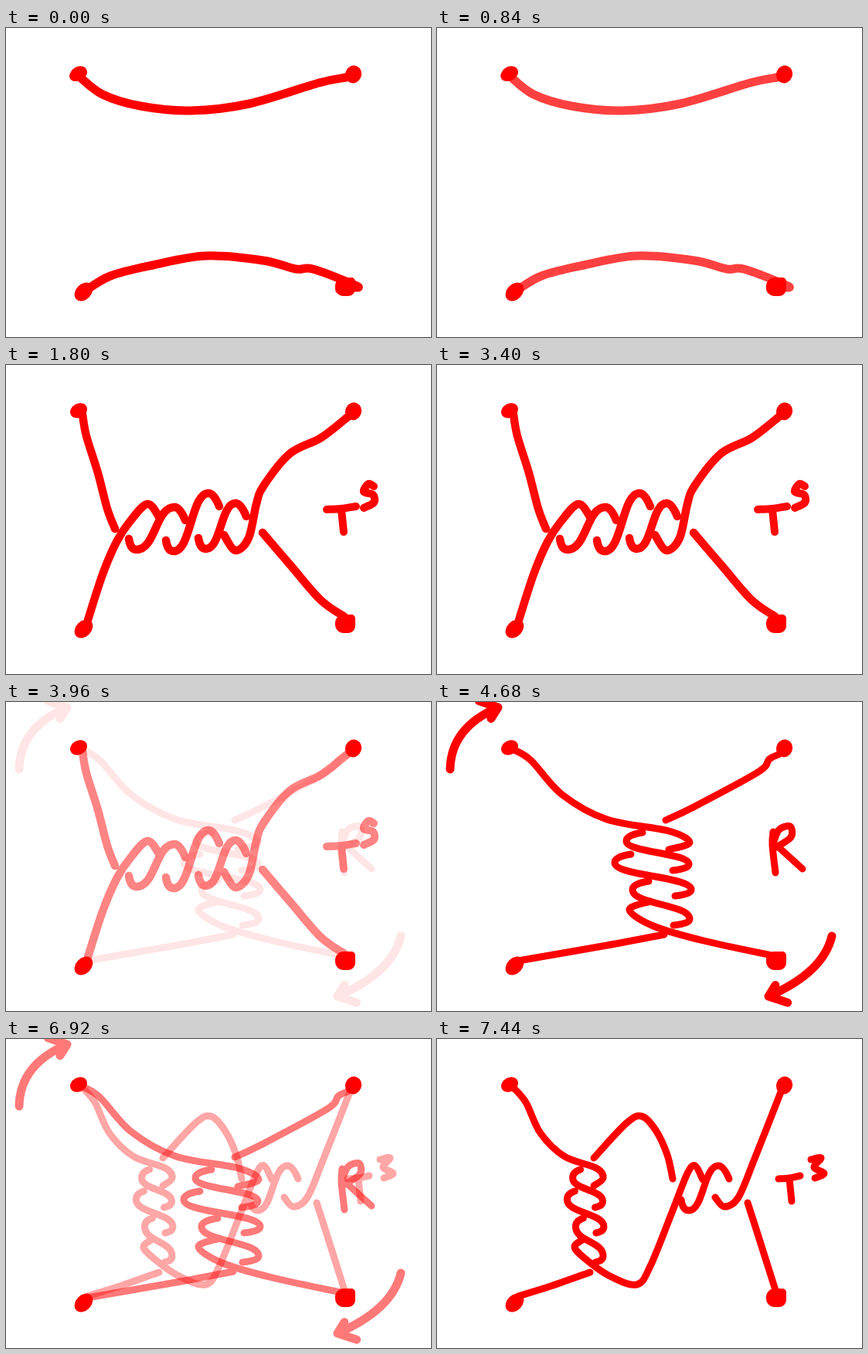
Animation, 550 px wide and 400 px high, one loop 8000 ms. Source, as an HTML page with a canvas:

```html
<!DOCTYPE html>
<html lang="en">
<head>
<meta charset="utf-8">
<title>Tangle moves</title>
<style>
html, body { margin: 0; width: 550px; height: 400px; overflow: hidden; background: #fff; }
canvas { display: block; }
</style>
</head>
<body>
<canvas id="stage" width="550" height="400"></canvas>
<script>
const ctx = document.getElementById('stage').getContext('2d');
const LOOP = 8000, STEP = 40;

// Smooth curve through a few points "x,y x,y ..."
function curve(text) {
  const pts = text.split(' ').map(s => s.split(',').map(Number));
  const at = i => pts[Math.max(0, Math.min(pts.length - 1, i))];
  const path = new Path2D();
  path.moveTo(...pts[0]);
  for (let i = 0; i < pts.length - 1; i++) {
    const [a, b, c, d] = [at(i - 1), at(i), at(i + 1), at(i + 2)];
    path.bezierCurveTo(
      b[0] + (c[0] - a[0]) / 6, b[1] + (c[1] - a[1]) / 6,
      c[0] - (d[0] - b[0]) / 6, c[1] - (d[1] - b[1]) / 6, c[0], c[1]);
  }
  return path;
}

// Strand of a horizontal twist: hook, low point, high point, hook
function wave(lowX, lowY, topX, topY) {
  const path = new Path2D(), mid = (lowX + topX) / 2;
  path.moveTo(lowX - 10, lowY - 14);
  path.quadraticCurveTo(lowX - 8, lowY, lowX, lowY);
  path.bezierCurveTo(mid, lowY, mid, topY, topX, topY);
  path.quadraticCurveTo(topX + 7, topY, topX + 14, topY + 17);
  return path;
}

// Strand of a vertical twist: hook, left turn, right turn, hook
function coil(left, y1, right, y2, hook) {
  const path = new Path2D(), mid = (y1 + y2) / 2;
  path.moveTo(left + hook, y1 - 11);
  path.quadraticCurveTo(left, y1 - 8, left, y1);
  path.bezierCurveTo(left, mid, right, mid, right, y2);
  path.quadraticCurveTo(right, y2 + 6, right - hook, y2 + 8);
  return path;
}

const coils = (mapX, hook) => [
  coil(mapX(245), 180, mapX(326), 210, hook),
  coil(mapX(230), 208, mapX(329), 243, hook),
  coil(mapX(253), 243, mapX(327), 281, hook)
];

function tee(x, y, w) {
  const path = curve(`${x - w / 2},${y + 1} ${x},${y} ${x + w / 2},${y - 3}`);
  path.moveTo(x, y + 1);
  path.lineTo(x + 3, y + 30);
  return path;
}

function arrow(x, y, cx, cy, tipX, tipY) {
  const path = new Path2D(), back = Math.atan2(cy - tipY, cx - tipX);
  path.moveTo(x, y);
  path.quadraticCurveTo(cx, cy, tipX, tipY);
  for (const [turn, len] of [[0.73, 26], [-0.61, 17]]) {
    path.moveTo(tipX, tipY);
    path.lineTo(tipX + len * Math.cos(back + turn), tipY + len * Math.sin(back + turn));
  }
  return path;
}

const group = (width, ...paths) => ({ width, paths });

const arcs = [
  group(11,
    curve('94,62 125,86 174,101 239,107 315,98 405,71 440,64'),
    curve('100,342 135,321 190,307 258,295 333,301 375,312 397,312 452,333 453,336')),
  group(14, curve('89,62 90,61'), curve('433,338 438,340'), curve('97,345 99,346'))
];

const twist5 = [
  group(10.5,
    curve('99,64 104,92 119,140 131,186 141,212'),
    curve('106,330 125,271 143,229 160,203 183,180 199,198'),
    wave(169, 239, 218, 184),
    wave(217, 241, 262, 166),
    wave(259, 238, 297, 179),
    curve('282,220 297,240 314,224 324,180 333,157 367,115 408,94 445,65'),
    curve('332,217 368,259 407,304 438,326')),
  group(10,
    tee(434, 186, 38),
    curve('476,157 469,154 463,164 475,168 476,178 463,185'))
];

const turn = [
  group(9,
    curve('100,62 122,76 162,120 220,152 300,167 327,182 300,191'),
    ...coils(x => x, 21),
    curve('276,258 249,269 280,290 345,309 438,329'),
    curve('296,153 330,137 415,91 430,74 442,68'),
    curve('105,335 220,315 294,301'),
    curve('435,168 434,185 438,221'),
    curve('436,180 443,165 457,161 458,175 439,188'),
    curve('441,187 473,216')),
  group(11, arrow(17, 87, 18, 33, 79, 7), arrow(511, 303, 500, 350, 429, 381))
];

const twist3 = [
  group(9,
    curve('98,62 115,82 134,122 165,152 206,167 215,180 203,190'),
    ...coils(x => 58 + 0.48 * x, 10),
    curve('188,260 178,269 190,283 222,306 258,318 276,294 305,222 324,174 334,164 344,182'),
    curve('203,154 245,109 265,100 283,118 298,150 305,181'),
    wave(326, 222, 364, 164),
    curve('360,205 372,217 390,205 411,155 446,66'),
    curve('402,212 412,243 438,325'),
    curve('105,333 150,319 198,302'),
    tee(456, 180, 28),
    curve('484,156 497,154 488,166 501,174 489,180'))
];

const dots = new Path2D();
for (const [x, y, rx, ry, tilt] of [
  [94, 59, 11.5, 9, -0.5], [449.5, 60, 10.5, 11.5, 0.4], [100.5, 341.5, 13.5, 10, -0.8]
]) {
  dots.moveTo(x, y);
  dots.ellipse(x, y, rx, ry, tilt, 0, 2 * Math.PI);
}
dots.roundRect(426, 323, 26, 24, [11, 5, 9, 11]);

// Fade-in and fade-out spans in ms
const scenes = [
  { art: arcs, out: [520, 1800] },
  { art: twist5, in: [1400, 1800], out: [3360, 4520] },
  { art: turn, in: [3880, 4680], out: [6520, 7360] },
  { art: twist3, in: [6640, 7440] }
];

const ramp = (t, [a, b]) => Math.max(0, Math.min(1, (t - a) / (b - a)));
const alphaAt = (s, t) => (s.in ? ramp(t, s.in) : 1) * (s.out ? 1 - ramp(t, s.out) : 1);

const layer = document.createElement('canvas');
layer.width = 550;
layer.height = 400;
const pen = layer.getContext('2d');
pen.lineCap = pen.lineJoin = 'round';
pen.strokeStyle = ctx.fillStyle = '#f00';

// Flatten a drawing first so that crossings keep one even tint
function paint(art, alpha) {
  pen.clearRect(0, 0, 550, 400);
  for (const { width, paths } of art) {
    pen.lineWidth = width;
    for (const path of paths) pen.stroke(path);
  }
  ctx.globalAlpha = alpha;
  ctx.drawImage(layer, 0, 0);
  ctx.globalAlpha = 1;
}

function draw(ms) {
  const t = Math.floor((ms % LOOP) / STEP) * STEP;
  ctx.clearRect(0, 0, 550, 400);
  for (const s of scenes) {
    const alpha = alphaAt(s, t);
    if (alpha > 0) paint(s.art, alpha);
  }
  ctx.fill(dots);
}

const start = performance.now();
function tick() {
  draw(performance.now() - start);
  requestAnimationFrame(tick);
}
tick();
</script>
</body>
</html>
```
